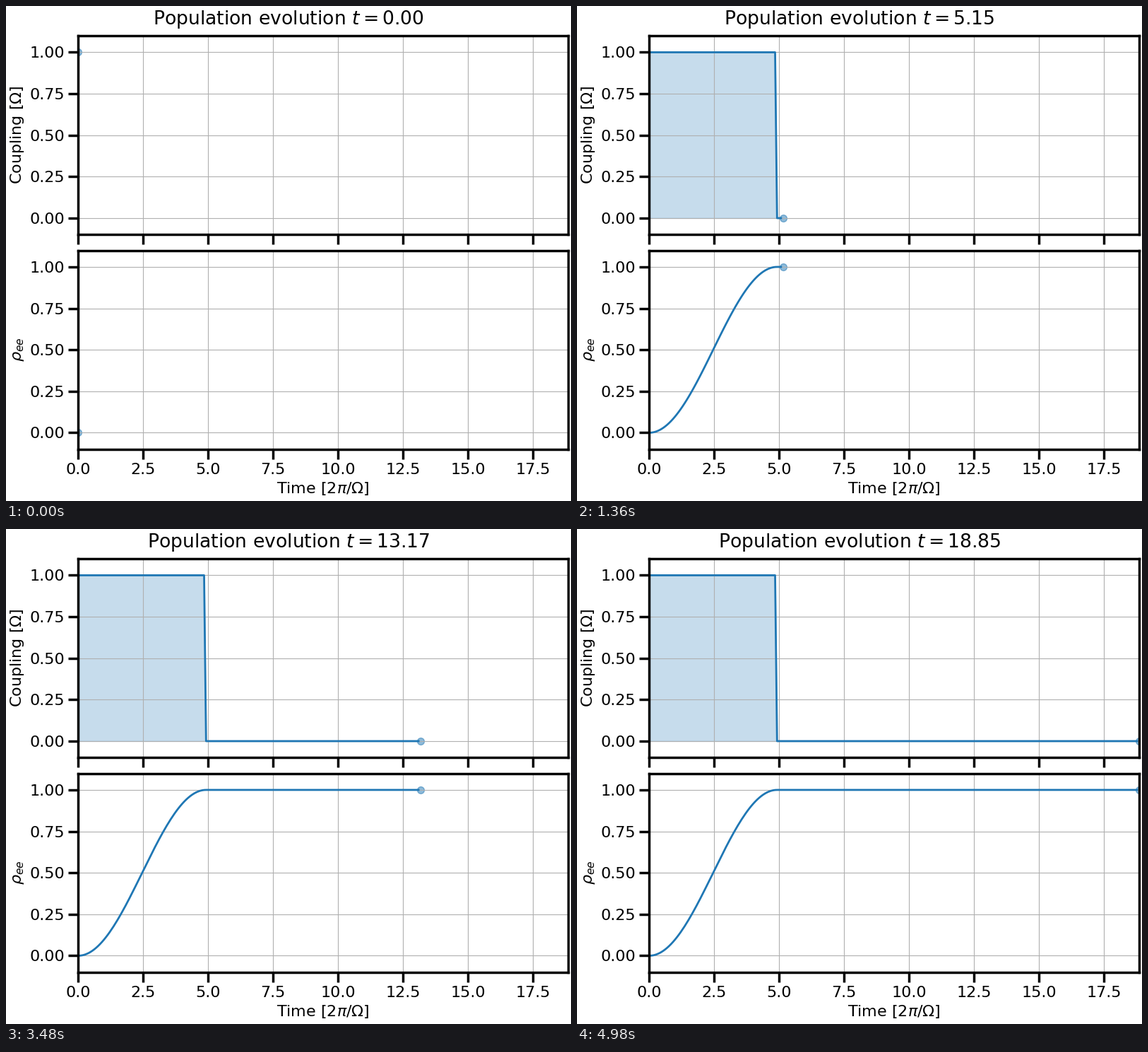
A matplotlib script that plays this animation: 800 px wide and 700 px high, repeating every 5000 ms.

```python
import numpy as np
import matplotlib.pyplot as plt
from matplotlib.animation import FuncAnimation

plt.rcParams.update({
    "font.family": "DejaVu Sans",
    "font.size": 16,
    "axes.linewidth": 2.5,
    "xtick.major.size": 10,
    "xtick.major.width": 2.5,
    "ytick.major.size": 10,
    "ytick.major.width": 2.5,
    "lines.linewidth": 2,
})

FRAMES = 250
BLUE = "#1f77b4"
STAGE_H = 700
PANEL_H = 281.4
PANEL_TOPS = 42.0, 345.5

# A resonant pulse that ends once the population is fully inverted
t = np.linspace(0, 6 * np.pi, FRAMES)
t_pulse = t[65]
coupling = np.where(np.arange(FRAMES) < 65, 1.0, 0.0)
rho = np.sin(np.pi / 2 * np.minimum(t / t_pulse, 1)) ** 2

fig, axes = plt.subplots(2, 1, sharex=True, figsize=(8, 7), dpi=100,
                         layout="constrained")


def title(i):
    return f"Population evolution $t={t[i]:.2f}$"


def add_trace(ax, label):
    ax.set(xlim=(0, t[-1]), ylim=(-0.1, 1.1), ylabel=label)
    ax.grid(True)
    line, = ax.plot([], [], color=BLUE)
    dot = ax.scatter([0], [0], s=50, color=BLUE, alpha=0.5)
    return line, dot


heading = fig.suptitle(title(0))
traces = [add_trace(axes[0], r"Coupling [$\Omega$]"),
          add_trace(axes[1], r"$\rho_{ee}$")]
area = axes[0].fill_between(t[:2], coupling[:2], color=BLUE, alpha=0.25)
axes[1].set_xlabel(r"Time [$2\pi/\Omega$]")

# Let the layout set the side margins once, then fix the panel heights
fig.draw_without_rendering()
fig.set_layout_engine("none")
for ax, top in zip(axes, PANEL_TOPS):
    box = ax.get_position()
    ax.set_position([box.x0, 1 - (top + PANEL_H) / STAGE_H,
                     box.width, PANEL_H / STAGE_H])


def update(i):
    heading.set_text(title(i))
    for (line, dot), y in zip(traces, (coupling, rho)):
        line.set_data(t[:i], y[:i])
        dot.set_offsets([(t[i], y[i])])
    if i:
        top = np.column_stack([t[:i], coupling[:i]])
        base = np.column_stack([t[:i][::-1], np.zeros(i)])
        area.set_verts([np.vstack([(0, 0), top, base])])
    else:
        area.set_verts([])
    return [heading, area]


anim = FuncAnimation(fig, update, frames=FRAMES, interval=20,
                     init_func=lambda: update(0), repeat=True,
                     repeat_delay=0, blit=False)
plt.show()
```
